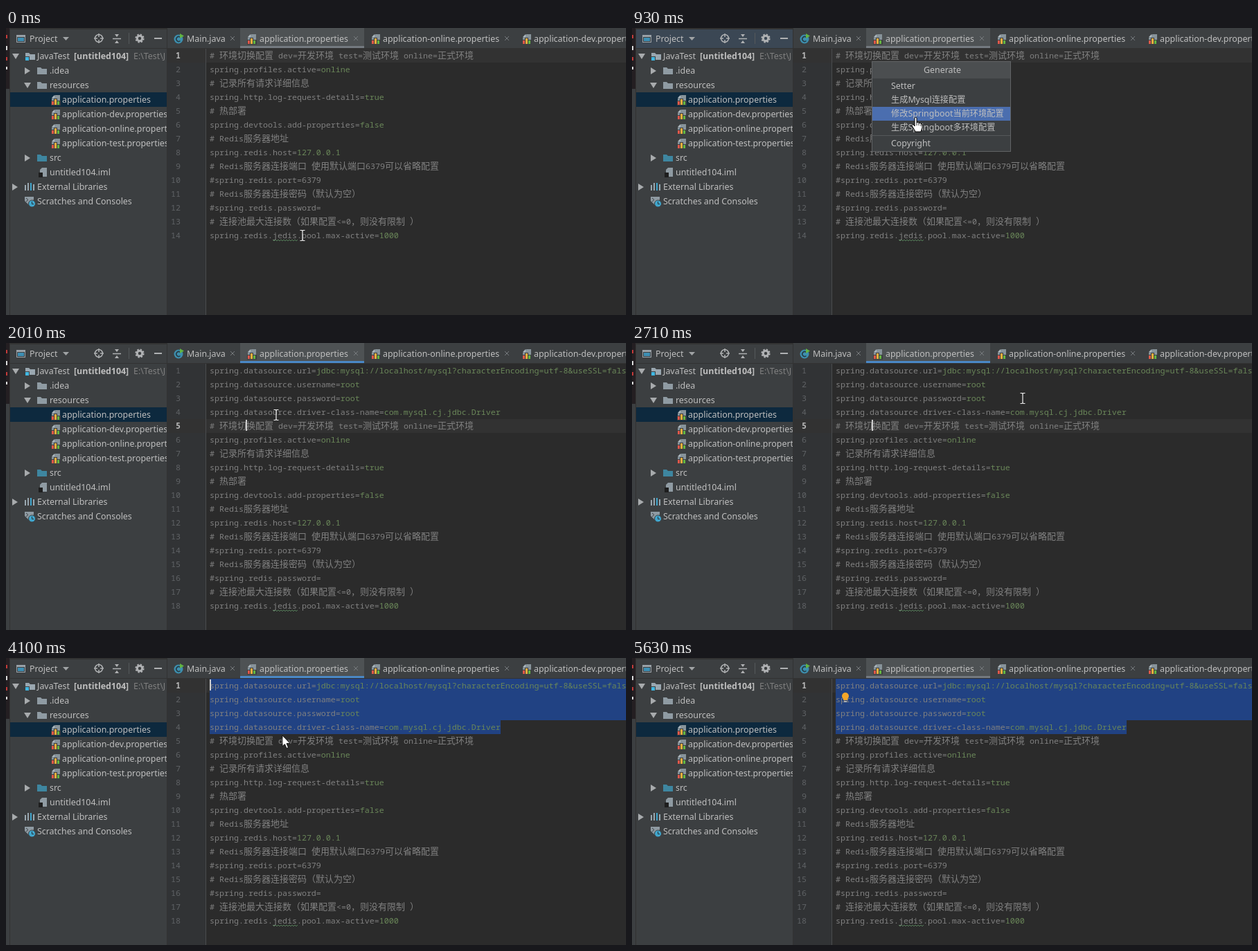
An HTML page that plays this animation: 895x415 px, repeating every 5730 ms.

```html
<!DOCTYPE html>
<html lang="zh">
<head>
<meta charset="utf-8">
<title>Editor</title>
<style>
html, body { margin: 0; width: 100%; height: 100%; overflow: hidden; background: #3c3f41; }
svg { display: block; }
text { white-space: pre; }
.ui { font: 12.4px "Noto Sans", "Noto Sans CJK SC", sans-serif; fill: #bfbfbf; }
.ui .cjk { font: 12.2px "Noto Sans CJK SC", sans-serif; }
.code { font: 11.667px "Noto Sans Mono", "DejaVu Sans Mono", monospace; fill: #808080; }
.code .cjk { font: 13px "Noto Sans CJK SC", sans-serif; }
.val { fill: #6a8759; }
.num { text-anchor: end; fill: #606366; }
.num.on { font-weight: bold; fill: #b4b4b4; }
</style>
</head>
<body>
<svg id="stage" width="895" height="415" viewBox="0 0 895 415"></svg>
<script>
const LOOP = 5730, ROW = 20, LEFT = 294, RIGHT = 895;

const added = [
  'spring.datasource.url=jdbc:mysql://localhost/mysql?characterEncoding=utf-8&useSSL=false',
  'spring.datasource.username=root',
  'spring.datasource.password=root',
  'spring.datasource.driver-class-name=com.mysql.cj.jdbc.Driver'
];
const base = [
  '# 环境切换配置 dev=开发环境 test=测试环境 online=正式环境',
  'spring.profiles.active=online',
  '# 记录所有请求详细信息',
  'spring.http.log-request-details=true',
  '# 热部署',
  'spring.devtools.add-properties=false',
  '# Redis服务器地址',
  'spring.redis.host=127.0.0.1',
  '# Redis服务器连接端口 使用默认端口6379可以省略配置',
  '#spring.redis.port=6379',
  '# Redis服务器连接密码（默认为空）',
  '#spring.redis.password=',
  '# 连接池最大连接数（如果配置<=0，则没有限制 ）',
  'spring.redis.jedis.pool.max-active=1000'
];
const menu = [
  [74, 'Setter'], [94, '生成Mysql连接配置'], [114, '修改Springboot当前环境配置'],
  [134, '生成Springboot多环境配置'], [157, 'Copyright']
];

// time, kind, x, y
const pointer = [
  [0, 'beam', 428, 300], [120, 'beam', 432, 295], [270, 'arrow', 438, 254], [390, 'arrow', 444, 206],
  [510, 'hand', 447, 171], [660, 'hand', 440, 160], [780, 'hand', 425, 144],
  [930, 'hand', 410, 129], [1050, 'hand', 398, 116], [1170, 'hand', 389, 106], [1330, 'hand', 389, 104],
  [2010, 'beam', 390, 104], [2310, 'beam', 299, 43], [2435, 'beam', 535, 60], [2560, 'beam', 420, 100],
  [2710, 'beam', 564, 80], [2860, 'beam', 650, 81], [2980, 'beam', 730, 83], [3130, 'beam', 749, 94],
  [3290, 'beam', 590, 85], [3410, 'beam', 430, 66], [3530, 'arrow', 268, 47], [3670, 'arrow', 145, 49],
  [4100, 'arrow', 399, 112], [4220, 'beam', 560, 190], [4340, 'beam', 720, 290],
  [4460, 'beam', 872, 408], [4580, '']
];
// time, highlighted menu entry
const picks = [[0, -1], [120, 0], [510, 4], [780, 3], [930, 2], [1170, 1], [2010, -1]];
// time, line, x, visible
const carets = [
  [0, 1, LEFT, 0], [2010, 5, 346, 1], [2860, 5, 346, 0], [3290, 4, 637, 1], [3410, 3, 483, 1],
  [3530, 2, 349, 1], [3670, 1, LEFT, 1], [4420, 1, LEFT, 0], [4950, 1, LEFT, 1], [5480, 1, LEFT, 0]
];

const $ = id => document.getElementById(id);
const at = (table, t) => table.findLast(row => row[0] <= t);
const esc = s => s.replace(/&/g, '&amp;').replace(/</g, '&lt;');
const mixed = s => esc(s).replace(/[\u3000-\u9fff\uff00-\uffef]+/g, '<tspan class="cjk">$&</tspan>');
const rect = (x, y, w, h, fill, more = '') => `<rect x="${x}" y="${y}" width="${w}" height="${h}" fill="${fill}" ${more}/>`;
const path = (d, fill, more = '') => `<path d="${d}" fill="${fill}" ${more}/>`;
const line = (d, color, w = 1) => path(d, 'none', `stroke="${color}" stroke-width="${w}"`);
const label = (x, y, s, style = '') => `<text class="ui" x="${x}" y="${y}" style="${style}">${mixed(s)}</text>`;
const group = (x, y, body) => `<g transform="translate(${x} ${y})">${body}</g>`;

function codeLine(s, i) {
  const cut = s[0] === '#' ? s.length : s.indexOf('=') + 1;
  return `<text class="code" x="${LEFT}" y="${44 + i * ROW}">${mixed(s.slice(0, cut))}` +
    `<tspan class="val">${esc(s.slice(cut))}</tspan></text>`;
}

// icons, centred on the given point
const propIcon = (x, y) => group(x, y,
  path('M-1-7H6V7H-6V-2Z', '#87939a') + path('M-6-3L-2-7V-3Z', '#aeb9c0') +
  path('M-7 1H-3V-2H2V1H7V8H-7Z', '#3c3f41') + rect(-6, 2, 3, 5, '#e0584a') +
  rect(-2, -1, 3, 8, '#f4af3d') + rect(2, 2, 3, 5, '#62b543'));
const folder = (x, y, fill) => group(x, y, path('M-7-5H-2L0-3H7V5H-7Z', fill));
const fold = (x, y, open) => group(x, y, path(open ? 'M-5-4H5L0 4Z' : 'M-3-5V5L5 0Z', '#a8abad'));
const cross = x => line(`M${x - 3} 12l6 6m0-6l-6 6`, '#777b7e');

function sidebar() {
  let s = rect(0, 0, 233, 415, '#3c3f41') + rect(0, 0, 5, 88, '#241f22') + rect(5, 0, 1, 415, '#323232');
  s += rect(0, 10, 2, 5, '#c03a3a') + rect(0, 26, 2, 6, '#d8d8d8') + rect(0, 42, 2, 5, '#c03a3a') + rect(0, 56, 2, 4, '#d8d8d8');
  s += rect(6, 0, 226, 2, '#323232') + '<rect id="head" x="6" y="2" width="226" height="27"/>' + rect(6, 29, 226, 1, '#323232');
  s += rect(15.5, 10.5, 12, 10, '#3c3f41', 'stroke="#9aa2a8"') + rect(15, 10, 13, 3, '#9aa2a8') + rect(17, 14, 9, 5, '#3e8fb4');
  s += label(34, 20, 'Project') + path('M82 13H91L86.5 18Z', '#a0a3a5');
  s += '<circle cx="134" cy="15" r="5.5" fill="none" stroke="#afb1b3" stroke-width="1.5"/>' + line('M134 8V13M134 17V22M127 15H132M136 15H141', '#afb1b3', 1.5);
  s += line('M154 15.5H166', '#afb1b3', 1.5) + path('M157 9H163L160 13ZM157 22H163L160 18Z', '#afb1b3') + rect(177, 7, 1, 16, '#55595b');
  s += '<circle cx="193" cy="15" r="3.7" fill="none" stroke="#afb1b3" stroke-width="3"/>' +
    '<circle cx="193" cy="15" r="5.6" fill="none" stroke="#afb1b3" stroke-width="2" stroke-dasharray="2.4 2"/>' + rect(214, 14, 11, 2, '#afb1b3');

  s += rect(6, 93, 226, 21, '#0d293e');
  s += fold(14, 41, 1) + folder(35, 41, '#9aa7b0') + rect(27, 41, 7, 7, '#3c3f41') + rect(28, 42, 5, 5, '#40b6e0');
  s += label(45, 45, 'JavaTest') + label(98, 45, '[untitled104]', 'font-weight: bold') + label(184, 45, 'E:\\Test\\J', 'fill: #808080');
  s += fold(30, 62) + folder(52, 62, '#8f9ba3') + label(63, 66, '.idea');
  s += fold(31, 83, 1) + folder(52, 83, '#8f9ba3') + label(63, 87, 'resources');
  ['', '-dev', '-online', '-test'].forEach((name, i) => {
    s += propIcon(72, 104 + i * 21) + label(81, 108 + i * 21, `application${name}.properties`);
  });
  s += fold(30, 188) + folder(52, 188, '#3e86a0') + label(63, 192, 'src');
  s += path('M52 202H59V215H49V205Z', '#8f9ba3') + rect(47, 209, 6, 7, '#1e1e1e') + label(63, 213, 'untitled104.iml');
  s += fold(12, 230) + rect(27, 227, 2, 8, '#9aa7b0') + rect(31, 224, 2, 11, '#9aa7b0') + rect(35, 224, 2, 11, '#40a5cc') + rect(39, 226, 2, 9, '#9aa7b0');
  s += label(45, 234, 'External Libraries');
  s += path('M27 244H40V248L33 256L27 250Z', '#8f9ba3') + line('M29 246l3 2.5-3 2.5', '#3c3f41') +
    '<circle cx="37.5" cy="254" r="5" fill="#40a5cc" stroke="#3c3f41"/>' + line('M37.5 251V254.5H40', '#263238');
  return s + label(45, 255, 'Scratches and Consoles');
}

function tabs() {
  let s = rect(233, 0, 662, 30, '#3c3f41') + rect(233, 29, 662, 1, '#323232') + rect(232, 0, 1, 415, '#323232');
  s += rect(338, 0, 179, 29, '#4e5254') + '<rect id="mark" x="338" y="26" width="179" height="3"/>';
  s += '<circle cx="249" cy="16" r="6.5" fill="#3d8fae"/>' + line('M251.5 13.5A3.4 3.4 0 1 0 251.5 18.5', '#263a44', 1.5) + path('M251 8L257 11.5 251 15Z', '#62b543');
  s += label(261, 20, 'Main.java') + cross(327);
  s += propIcon(355, 16) + label(366, 20, 'application.properties') + cross(505);
  s += propIcon(534, 16) + label(544, 20, 'application-online.properties') + cross(723);
  return s + propIcon(752, 16) + label(762, 20, 'application-dev.properties');
}

function editor() {
  let s = rect(233, 30, 662, 385, '#2b2b2b') + rect(233, 30, 55, 385, '#313335');
  s += `<rect id="row" x="233" width="662" height="${ROW}" fill="#323232"/>` + rect(288, 30, 1, 385, '#4a4c4e');
  s += '<path id="sel" fill="#214283"/>';
  for (let n = 1; n <= 18; n++) s += `<text class="code num" id="n${n}" x="252" y="${24 + n * ROW}">${n}</text>`;
  s += `<g id="added">${added.map(codeLine).join('')}</g>`;
  let wave = 'M385 306';
  for (let i = 0; i < 9; i++) wave += 'l2 2l2-2';
  s += `<g id="base">${base.map(codeLine).join('')}${line(wave, '#5b8a5f', .9)}</g>`;
  s += '<rect id="caret" width="2" height="16" fill="#d0d0d0"/>';
  return s + '<g id="bulb"><circle cx="308" cy="55" r="5" fill="#f4a62a"/>' +
    rect(305, 58, 6, 3, '#f4a62a') + rect(306, 62, 4, 2, '#b0b0b0') + '</g>';
}

function popup() {
  let s = rect(346.5, 48.5, 200, 130, '#3c3f41', 'stroke="#616365"') + rect(347, 49, 199, 24, '#4b4e50');
  s += label(448, 65, 'Generate', 'text-anchor: middle') + rect(347, 155, 199, 1, '#555759');
  s += '<rect id="pick" x="347" width="199" height="20" fill="#4b6eaf"/>';
  return s + menu.map(([y, name]) => label(374, y + 14, name)).join('');
}

const shapes = {
  hand: path('M-2 1Q-.5-1 1 1V8Q3 6.5 4 8.5Q6 7.5 7 9.5Q9 9 9 11V15Q8 18 7 21H-1Q-2 18-5 14Q-7 11-5 10.5Q-3 10.5-2 13Z', '#fff', 'stroke="#000"') +
    line('M1 8V12M4 9V12M7 10V13', '#000', .8),
  arrow: path('M0 0V15.5L3.5 12.5 6 18.5 8.5 17.5 6 11.5H11Z', '#fff', 'stroke="#000" stroke-width=".8"'),
  beam: line('M-3.5-7.5H-1L0-6.5 1-7.5H3.5M0-6.5V6.5M-3.5 7.5H-1L0 6.5 1 7.5H3.5', '#f0f0f0', 1.2)
};

$('stage').innerHTML = sidebar() + editor() + tabs() + `<g id="popup">${popup()}</g>` +
  Object.keys(shapes).map(k => `<g id="${k}">${shapes[k]}</g>`).join('');

const show = (id, on) => $(id).setAttribute('display', on ? 'inline' : 'none');
const set = (id, key, value) => $(id).setAttribute(key, value);

// selection runs from the caret to the end of line 4
function selection(row, x) {
  let d = '';
  for (let n = row; n <= 4; n++) {
    const from = n === row ? x : LEFT, to = n === 4 ? 714 : RIGHT;
    d += `M${from} ${10 + n * ROW}H${to}v${ROW}H${from}Z`;
  }
  return d;
}

function draw(t) {
  const open = t >= 120 && t < 2010, grown = t >= 2010;
  show('popup', open);
  set('head', 'fill', open ? '#3b4754' : '#3c3f41');
  set('mark', 'fill', grown && t < 5630 ? '#4a88c7' : '#747a80');
  show('added', grown);
  set('base', 'transform', `translate(0 ${grown ? 80 : 0})`);

  const pick = at(picks, t)[1];
  show('pick', pick >= 0);
  if (pick >= 0) set('pick', 'y', menu[pick][0]);

  const [, row, x, lit] = at(carets, t);
  set('row', 'y', 10 + row * ROW);
  set('caret', 'x', x);
  set('caret', 'y', 11 + row * ROW);
  show('caret', lit);
  for (let n = 1; n <= 18; n++) {
    show('n' + n, n <= 14 || grown);
    set('n' + n, 'class', n === row ? 'code num on' : 'code num');
  }
  set('sel', 'd', t >= 3290 ? selection(row, x) : '');
  show('bulb', t >= 4460);

  const [, kind, px, py] = at(pointer, t);
  for (const k in shapes) show(k, k === kind);
  if (kind) set(kind, 'transform', `translate(${px} ${py})`);
}

const start = performance.now();
function tick() {
  draw((performance.now() - start) % LOOP);
  requestAnimationFrame(tick);
}
tick();
</script>
</body>
</html>
```
